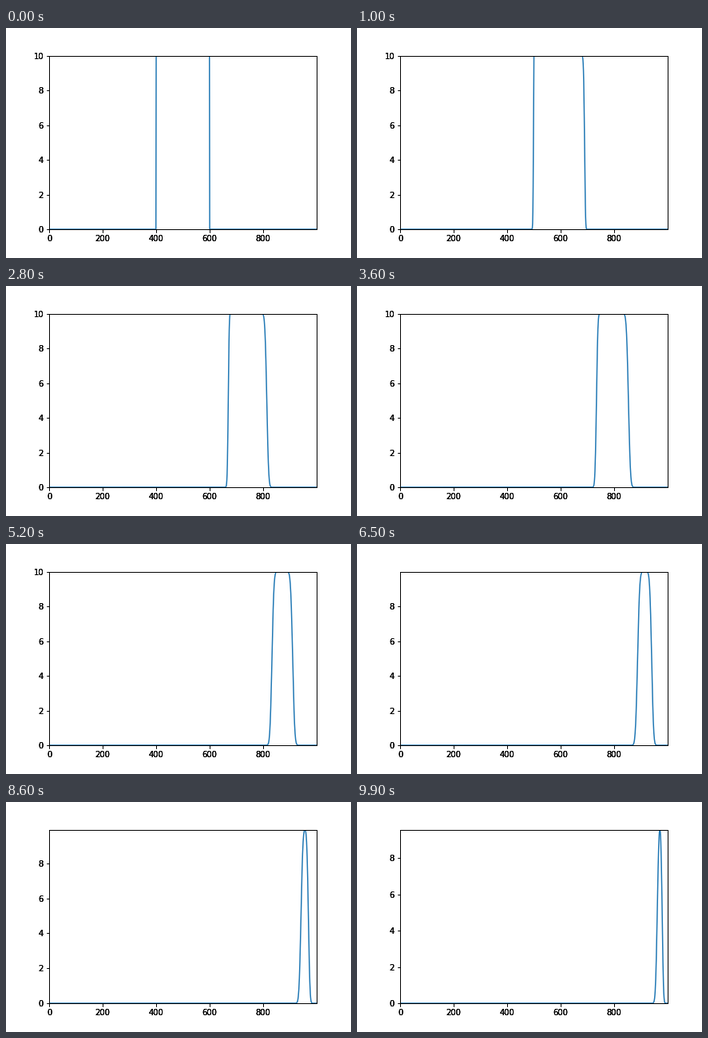
A matplotlib script that plays this animation: 432 by 288 pixels, repeating every 10000 ms.

```python
import numpy as np
import matplotlib.pyplot as plt
from matplotlib.animation import FuncAnimation
from matplotlib.ticker import MultipleLocator

N = 1000          # grid cells
FRAMES = 100
STEPS = 10        # upwind steps per frame
LAST_FULL = 53    # last frame whose plateau still reaches 10

plt.rcParams.update({"font.family": "DejaVu Sans", "font.size": 10})


def advect():
    """Upwind advection of a box pulse with speed sin(pi x)."""
    speed = np.sin(np.pi * np.arange(N) / N)
    u = np.zeros(N)
    u[400:600] = 10
    states = [u.copy()]
    for _ in range(FRAMES - 1):
        for _ in range(STEPS):
            u[1:] -= speed[1:] * (u[1:] - u[:-1])
        states.append(u.copy())
    return states


states = advect()

fig = plt.figure(figsize=(6, 4), dpi=72, facecolor="white")


def add_axes(is_base):
    ax = fig.add_axes([0.125, 0.125, 0.775, 0.755])
    ax.set_xlim(0, N - 1)
    ax.xaxis.set_major_locator(MultipleLocator(200))
    ax.yaxis.set_major_locator(MultipleLocator(2))
    ax.patch.set_visible(is_base)
    return ax


# Stacked copies give the heavy, dark tick labels.
layers = [add_axes(i == 0) for i in range(3)]
line, = layers[0].plot(np.arange(N), states[0], color="#1f77b4", lw=1.5)


def draw(n):
    u = states[n]
    top = 10 if n <= LAST_FULL else min(u.max(), 9.9999)
    line.set_ydata(u)
    for ax in layers:
        ax.set_xlim(0, N - 1)
        ax.set_ylim(0, top)
    return line,


anim = FuncAnimation(fig, draw, frames=FRAMES, init_func=lambda: draw(0),
                     interval=100, repeat=True, repeat_delay=0, blit=False)
plt.show()
```
